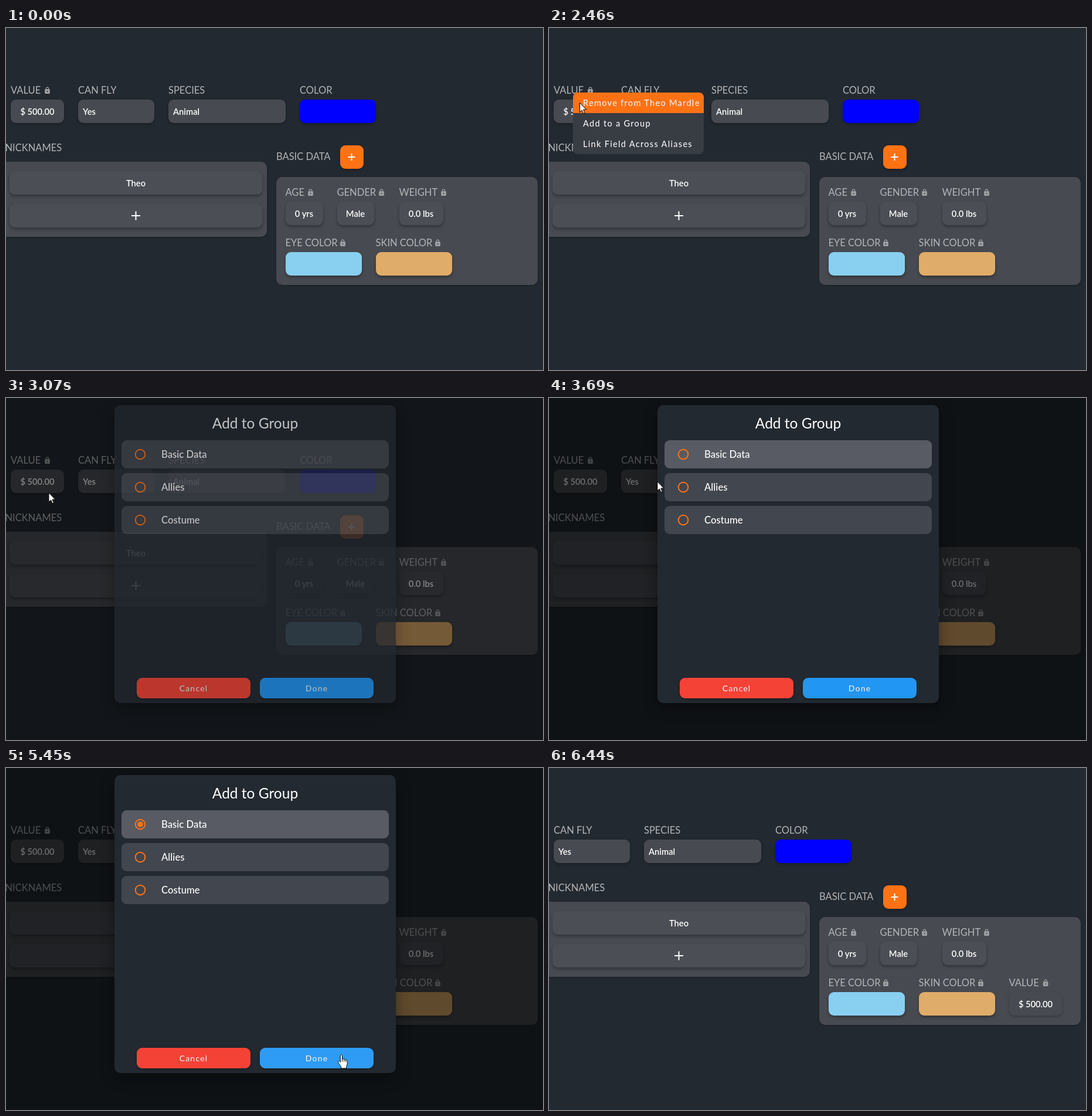
An HTML page for the animation above (7.92 s loop, 916x583 px).

```html
<!DOCTYPE html>
<html lang="en">
<head>
<meta charset="utf-8">
<title>Add a field to a group</title>
<style>
  html, body { margin: 0; width: 100%; height: 100%; overflow: hidden; background: #232930; }
  #stage { position: relative; width: 916px; height: 583px; overflow: hidden; background: #232930;
    font: 600 14.7px Lato, sans-serif; color: #fff; }
  #stage div { position: absolute; box-sizing: border-box; white-space: nowrap; }
  svg { position: absolute; overflow: visible; }
  .layer { left: 0; top: 0; width: 916px; height: 583px; }
  .label { font-size: 16.5px; font-weight: 400; line-height: 20px; color: #b3b5b8; }
  .lock { width: 13px; height: 13px; fill: #a0a2a5; }
  .box { border-radius: 9px; background: #474a50; text-align: center; line-height: 40px;
    box-shadow: 0 2px 4px rgba(0, 0, 0, .25); }
  .panel { border-radius: 10px; background: #474a50; box-shadow: 0 1px 3px rgba(0, 0, 0, .25); }
  .inner { background: #4b4e55; box-shadow: 0 3px 5px rgba(0, 0, 0, .3); }
  .left { text-align: left; padding-left: 8px; }
  .accent { background: #ff7214; }
  .menu { border-radius: 8px; background: #383c43; overflow: hidden; }
  .option { padding-left: 17px; font-size: 14.5px; font-weight: 500; letter-spacing: 1.3px;
    line-height: 35px; color: #f2f2f2; }
  .backdrop { background: #000; }
  .dialog { border-radius: 10px; background: #232930; box-shadow: 0 8px 24px rgba(0, 0, 0, .4); }
  .title { font-size: 24.5px; font-weight: 400; line-height: 40px; text-align: center; }
  .row { border-radius: 9px; background: #42464e; }
  .rowtext { font-size: 16.7px; font-weight: 500; line-height: 48px; }
  .lit { background: #585b63; }
  .button { border-radius: 9px; overflow: hidden; text-align: center; line-height: 35px;
    font-size: 14px; font-weight: 500; letter-spacing: 1.2px; color: #e9eef2;
    box-shadow: 0 2px 4px rgba(0, 0, 0, .3); }
  .wave { border-radius: 50%; background: rgba(255, 255, 255, .14); }
</style>
</head>
<body>
<div id="stage"></div>
<script>
const stage = document.getElementById('stage');

function add(parent, cls, x, y, w, h, html = '') {
  const el = document.createElement('div');
  el.className = cls;
  el.style.cssText = `left:${x}px;top:${y}px;width:${w}px;height:${h}px`;
  el.innerHTML = html;
  parent.append(el);
  return el;
}
const layer = (parent, cls = '') => add(parent, 'layer ' + cls, 0, 0, 916, 583);

function svg(parent, markup) {
  const holder = layer(parent);
  holder.innerHTML = `<svg width="916" height="583">${markup}</svg>`;
  return holder;
}

function lock(parent, cx, cy) {
  add(parent, '', cx - 6.5, cy - 6.5, 13, 13, `<svg class="lock" viewBox="0 0 24 24">
    <path fill-rule="evenodd" d="M18 8h-1V6A5 5 0 0 0 7 6v2H6a2 2 0 0 0-2 2v10a2 2 0 0 0 2 2h12a2 2 0 0 0
    2-2V10a2 2 0 0 0-2-2zM9 8V6a3 3 0 0 1 6 0v2zM12 13a2 2 0 1 0 .01 0z"/></svg>`);
}

function plus(parent, cx, cy, r) {
  svg(parent, `<path d="M${cx - r} ${cy}h${2 * r}M${cx} ${cy - r}v${2 * r}" stroke="#fff" stroke-width="2"/>`);
}

const label = (parent, x, cy, text) => add(parent, 'label', x, cy - 10, 150, 20, text);

function field(parent, x, y, w, name, { value = '', cls = '', color, lockX } = {}) {
  label(parent, x, y - 16, name);
  if (lockX) lock(parent, lockX, y - 16);
  const box = add(parent, 'box ' + cls, x, y, w, 40, value);
  if (color) box.style.background = color;
}

// Page
const page = layer(stage);
const topRow = layer(page);
field(topRow, 123, 122, 130, 'CAN FLY', { value: 'Yes', cls: 'left' });
field(topRow, 277, 122, 200, 'SPECIES', { value: 'Animal', cls: 'left' });
field(topRow, 501, 122, 130, 'COLOR', { color: '#00f' });

label(page, -1.5, 204, 'NICKNAMES');
add(page, 'panel', -12, 228, 457, 128);
add(page, 'box inner', 6, 244, 431, 40, 'Theo');
add(page, 'box inner', 6, 300, 431, 40);
plus(page, 221.5, 320, 7.5);

label(page, 461, 219, 'BASIC DATA');
add(page, 'box accent', 569.5, 200, 40, 40);
plus(page, 589.5, 220, 6);
add(page, 'panel', 460.5, 254, 446.5, 184);
field(page, 476.5, 296, 64, 'AGE', { value: '0 yrs', cls: 'inner', lockX: 519.5 });
field(page, 564.5, 296, 63, 'GENDER', { value: 'Male', cls: 'inner', lockX: 640.5 });
field(page, 670.5, 296, 75, 'WEIGHT', { value: '0.0 lbs', cls: 'inner', lockX: 746.5 });
field(page, 476.5, 382, 130, 'EYE COLOR', { cls: 'inner', color: '#89cff0', lockX: 574.5 });
field(page, 630.5, 382, 130, 'SKIN COLOR', { cls: 'inner', color: '#e0ac69', lockX: 736.5 });

const valueField = layer(page);
field(valueField, 8, 122, 91, 'VALUE', { value: '$ 500.00', lockX: 70 });

// Context menu
const menu = add(stage, 'menu', 41, 110, 223, 105);
const hover = add(menu, 'accent', 0, 0, 223, 35);
['Remove from Theo Mardle', 'Add to a Group', 'Link Field Across Aliases']
  .forEach((text, i) => add(menu, 'option', 0, 35 * i, 223, 35, text));

// Dialog
const backdrop = layer(stage, 'backdrop');
const dialog = layer(stage);
add(dialog, 'dialog', 185, 11.5, 480, 508);
add(dialog, 'title', 185, 23, 480, 40, 'Add to Group');
const rowTops = [72, 128, 184];
rowTops.forEach(y => add(dialog, 'row', 197, y, 456, 48));
const focusRow = add(dialog, 'row lit', 197, 72, 456, 48);
['Basic Data', 'Allies', 'Costume'].forEach((text, i) => {
  add(dialog, 'rowtext', 265, rowTops[i], 200, 48, text);
  svg(dialog, `<circle cx="229" cy="${rowTops[i] + 24}" r="8.3" fill="none" stroke="#ff7214" stroke-width="2"/>`);
});
const dot = svg(dialog, '<circle cx="229" cy="96" r="4.8" fill="#ff7214"/>');
const radioWave = svg(dialog, '<circle cx="229" cy="96" r="20" fill="#ffd0a8" fill-opacity=".1"/>');

const button = (x, color, text) => {
  const el = add(dialog, 'button', x, 477, 194, 35, text);
  el.style.background = color;
  return el;
};
button(223, '#f44336', 'Cancel');
const done = button(433, '#2196f3', 'Done');
const doneHover = add(done, '', 0, 0, 194, 35);
doneHover.style.background = 'rgba(255,255,255,.06)';
const doneWave = add(done, 'wave', 14, -112, 250, 250);

// Pointer, with its hot spot at 0,0
const pointer = layer(stage);
const ring = svg(pointer, '<circle cy="-1" r="12" fill="#c8c20a" fill-opacity=".7"/>');
const outlined = d => `<path d="${d}" fill="#fff" stroke="#000" stroke-linejoin="round"/>`;
const arrow = svg(pointer, outlined('M.5.5V16.5L4.1 13 6.6 18.7 9 17.7 6.6 12H11.5Z'));
const hand = svg(pointer, outlined(`M-1.7 1.6C-1.7-.3 1.5-.3 1.5 1.6V8C2.2 6.8 4.5 7 4.7 8.6 5.5 7.6 7.4 8 7.6 9.4
  8.5 8.6 10.2 9 10.2 10.8V15C10.2 17.5 9.2 19 8.6 20.5V23.5H-.6V20.5C-1.7 18.5-4.8 15-5.4 12.8
  -5.8 10.8-3.8 10.2-2.8 11.5L-1.7 13Z`)
  + '<path d="M1.5 8v4M4.7 8.6v3.6M7.6 9.4v3" stroke="#000" fill="none"/>');

const LOOP = 7920, TICK = 76.6, TICKS = 104;
const tracks = [];

function track(el, keys) {
  const frames = keys.map(([tick, props, easing = 'step-end']) => ({ offset: tick / TICKS, easing, ...props }));
  frames.push({ ...frames.at(-1), offset: 1 });
  const anim = el.animate(frames, { duration: TICKS, fill: 'both' });
  anim.pause();
  tracks.push(anim);
}
// Alternates hidden and shown at the given ticks
const toggle = (el, ...ticks) =>
  track(el, [0, ...ticks].map((tick, i) => [tick, { opacity: i % 2 }]));
const fade = (el, ...keys) =>
  track(el, keys.map(([tick, opacity]) => [tick, { opacity }, 'linear']));
const move = (el, ...keys) =>
  track(el, keys.map(([tick, x, y, easing]) => [tick, { transform: `translate(${x}px, ${y}px)` }, easing]));

move(topRow, [0, 0, 0], [74, -115, 0]);
move(valueField, [0, 0, 0], [74, 776.5, 260]);

toggle(menu, 22, 40);
toggle(hover, 32);
move(hover, [0, 0, 0], [33, 0, 35]);

fade(backdrop, [0, 0], [39, 0], [40, .48], [42, .57], [73, .57], [74, .5], [75, .33], [77, 0]);
fade(dialog, [0, 0], [39, 0], [40, .75], [41, .94], [42, 1], [73, 1], [74, .85], [75, .5], [76, .15], [77, 0]);
toggle(focusRow, 44);
toggle(dot, 56);
fade(radioWave, [0, 0], [54, 0], [56, 1], [58, .8], [59, 0]);
toggle(doneHover, 69, 75);
track(doneWave, [
  [0, { transform: 'scale(0)' }],
  [73, { transform: 'scale(.2)' }, 'linear'],
  [75, { transform: 'scale(1)' }, 'linear'],
  [77, { transform: 'scale(1.3)' }],
]);

const glide = 'cubic-bezier(.4, 0, .3, 1)', line = 'linear';
move(pointer,
  [0, 870, 600], [5, 838, 570, glide], [15, 16, 113, line], [18, 41, 110],
  [31, 41, 110, line], [32, 52, 127, line], [34, 72, 160], [40, 72.5, 161],
  [42, 73, 161, 'ease-in-out'], [49, 189, 141, 'ease-out'], [55, 219.5, 102],
  [58, 219.5, 102, line], [59, 226, 106, 'ease-in-out'], [70, 568, 484, line], [71, 572, 488.5],
  [76, 576, 490, 'ease-in-out'], [83, 876, 581], [84, 877, 600]);
toggle(hand, 33, 40, 51, 63, 69, 75);
track(arrow, [0, 33, 40, 51, 63, 69, 75].map((tick, i) => [tick, { opacity: 1 - i % 2 }]));
toggle(ring, 20, 22, 38, 39, 54, 55, 73, 74);

const start = performance.now();
function draw() {
  const time = (performance.now() - start) % LOOP;
  const tick = Math.floor((time + 8) / TICK);
  for (const anim of tracks) anim.currentTime = tick + .001;
  requestAnimationFrame(draw);
}
draw();
</script>
</body>
</html>
```
